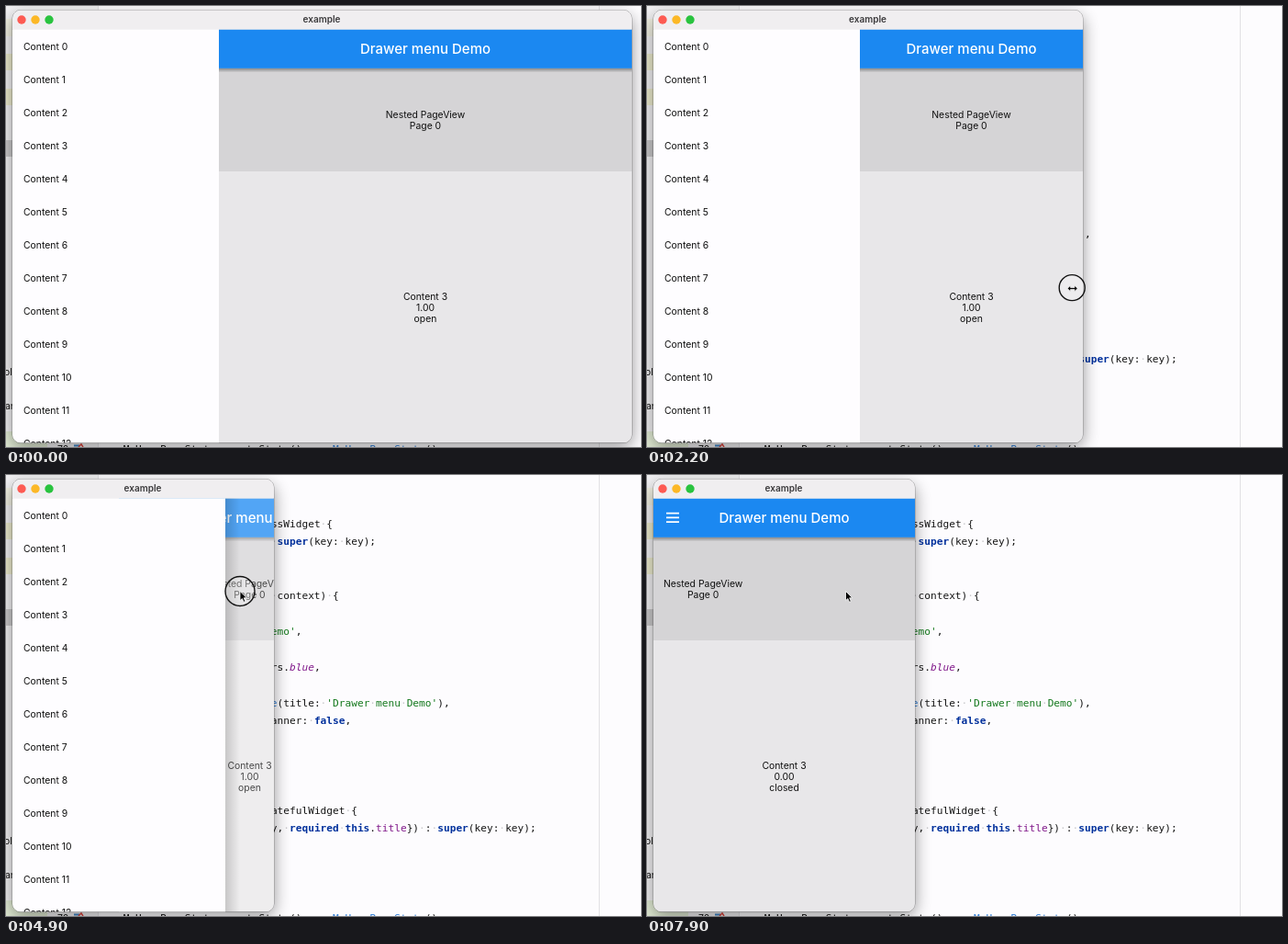
An HTML page that plays this animation: 692 px wide and 480 px high, repeating every 8000 ms.

```html
<!DOCTYPE html>
<html lang="en">
<head>
<meta charset="utf-8">
<title>Drawer menu</title>
<style>
  html, body { margin: 0; width: 100%; height: 100%; overflow: hidden; background: #fdfcfe; }
  svg { display: block; }
  text { font: 10.4px Inter, "Open Sans", sans-serif; fill: #111; white-space: pre; }
  .mid { text-anchor: middle; }
  .code text { font: 11.17px "DejaVu Sans Mono", monospace; fill: #151515; }
  .code .dots { fill: #c9c8cb; }
  .kw { fill: #00309c; font-weight: bold; }
  .str { fill: #13781c; }
  .field { fill: #80188a; }
  .type { fill: #2c7bd6; }
  .slant { font-style: italic; }
  #name { font-weight: 600; font-size: 10px; fill: #3a393b; }
  #title { font-weight: 500; font-size: 15px; fill: #fff; }
</style>
</head>
<body>
<svg id="stage" width="692" height="480" viewBox="0 0 692 480">
  <defs>
    <filter id="blur" x="-20%" y="-20%" width="140%" height="140%"><feGaussianBlur stdDeviation="9"/></filter>
    <linearGradient id="barShade" x2="0" y2="1">
      <stop stop-color="#000" stop-opacity=".38"/><stop offset="1" stop-color="#000" stop-opacity="0"/>
    </linearGradient>
    <linearGradient id="edgeShade">
      <stop stop-color="#000" stop-opacity=".16"/><stop offset="1" stop-color="#000" stop-opacity="0"/>
    </linearGradient>
    <clipPath id="winClip"><rect class="win" x="7" y="4.5" height="471" rx="9"/></clipPath>
  </defs>

  <rect width="692" height="480" fill="#fdfcfe"/>
  <rect width="101" height="480" fill="#f1f0f2"/>
  <g id="strips"></g>
  <path d="M100.5 0V480M646.5 0V480" stroke="#e2e1e4"/>
  <text x="-2" y="402">oll</text>
  <text x="-1" y="439">ar</text>
  <text x="56" y="486" fill="#999">70</text>
  <path d="M74 478.5h6" stroke="#3f86c8" stroke-width="2"/>
  <path d="M79 480l3-3 2 3" stroke="#d8443c" fill="none" stroke-width="1.5"/>
  <g class="code" id="code"></g>

  <rect class="win" x="7" y="11" height="469" rx="9" opacity=".42" filter="url(#blur)"/>
  <rect class="win" x="7" y="4.5" height="471" rx="9" fill="#e8e7e9" stroke="#000" stroke-opacity=".3"/>
  <g clip-path="url(#winClip)">
    <rect class="win" x="7" y="4" height="21.5" fill="#f0eef0"/>
    <circle cx="17" cy="15" r="4.7" fill="#fd5b53"/>
    <circle cx="32" cy="15" r="4.7" fill="#fcb827"/>
    <circle cx="47" cy="15" r="4.7" fill="#29c33f"/>
    <text id="name" class="mid" y="18.2">example</text>

    <svg id="body" y="25.5" height="450">
      <rect width="100%" height="450" fill="#e8e7e9"/>
      <rect y="42" width="100%" height="112.5" fill="#d5d4d6"/>
      <g id="pages"></g>
      <rect y="42" width="100%" height="5" fill="url(#barShade)"/>
      <rect width="100%" height="42.3" fill="#1b88f1"/>
      <text id="title" class="mid" x="50%" y="26.3">Drawer menu Demo</text>
      <path id="burger" d="M14 16.2h14M14 20.9h14M14 25.6h14" stroke="#fff" stroke-width="1.7"/>
      <text class="mid" x="50%" y="294.8">Content 3</text>
      <text class="mid" x="50%" y="306.8" id="value"></text>
      <text class="mid" x="50%" y="318.8" id="state"></text>
      <rect id="veil" width="100%" height="450" fill="#fff"/>
    </svg>
    <rect id="edge" y="25.5" width="16" height="450" fill="url(#edgeShade)"/>
    <g id="drawer"><rect id="sheet" y="25.5" height="450" fill="#fefdff"/></g>
  </g>

  <g id="pointer">
    <circle id="ring" fill="#fff" fill-opacity=".22" stroke="#111" stroke-width="1.4"/>
    <path id="arrow" d="M0 0V10.2L2.4 8L4 11.8L5.8 11L4.2 7.3H7.4Z" fill="#000" stroke="#fff" stroke-width=".8"/>
    <path id="resize" d="M-5.5 0L-2.2 -3.2V-1H2.2V-3.2L5.5 0L2.2 3.2V1H-2.2V3.2Z" fill="#000" stroke="#fff" stroke-width=".7"/>
  </g>
</svg>
<script>
const LOOP = 8000, STEP = 100, LEFT = 7;
const $ = id => document.getElementById(id);
const set = (el, attrs) => { for (const k in attrs) el.setAttribute(k, attrs[k]); };
const add = (parent, tag, attrs, html = "") => {
  const el = document.createElementNS("http://www.w3.org/2000/svg", tag);
  set(el, attrs);
  el.innerHTML = html;
  return parent.appendChild(el);
};
const show = (el, on) => set(el, { visibility: on ? "visible" : "hidden" });

// Code editor behind the window, keyed by row number.
const rows = {
  "-3": "  runApp(const MyApp());",
  0: "class MyApp extends StatelessWidget {",
  1: "  const MyApp({Key? key}) : super(key: key);",
  4: "  Widget build(BuildContext context) {",
  6: "      title: 'Drawer menu Demo',",
  8: "        primarySwatch: Colors.blue,",
  10: "      home: const MyHomePage(title: 'Drawer menu Demo'),",
  11: "      debugShowCheckedModeBanner: false,",
  16: "class MyHomePage extends StatefulWidget {",
  17: "  const MyHomePage({Key? key, required this.title}) : super(key: key);",
  22: "  _MyHomePageState createState() => _MyHomePageState();"
};
const rules = [
  ["str", "'[^']*'"],
  ["kw", "\\b(?:class|extends|const|super|required|this|false)\\b"],
  ["field", "title(?=})"],
  ["field slant", "blue"],
  ["type", "MyHomePage(?=\\(t)|_MyHomePageState(?=\\()|MyApp(?=\\(\\))"]
];
const syntax = new RegExp(rules.map(r => `(${r[1]})`).join("|"), "g");
const paint = line => line.replace(syntax, (m, ...groups) =>
  `<tspan class="${rules[groups.findIndex(g => g === m)][0]}">${m}</tspan>`);
for (const n in rows) {
  const at = { x: 107.5, y: 56.8 + 19.5 * n };
  add($("code"), "text", { ...at, class: "dots" }, rows[n].replace(/\S/g, "\0").replace(/ /g, "·").replace(/\0/g, " "));
  add($("code"), "text", at, paint(rows[n]));
}

const strips = [[14, 19, "#f1f0e2"], [52, 18, "#ecebcd"], [90, 18, "#ecebcd"], [146, 18, "#c9c8ca"], [463, 17, "#e0ead3"]];
for (const [y, height, fill] of strips) add($("strips"), "rect", { y, width: 45, height, fill });

for (let i = 0; i < 13; i++) add($("drawer"), "text", { x: 12, y: 48 + 36 * i }, `Content ${i}`);

const pages = [0, 1].map(i => {
  const box = add($("pages"), "svg", { y: 42, height: 112, width: "100%" });
  add(box, "text", { class: "mid", x: "50%", y: 54.8 }, "Nested PageView");
  add(box, "text", { class: "mid", x: "50%", y: 66.8 }, `Page ${i}`);
  return box;
});

// Keys are [time, value, value...], joined by straight lines.
const edgeKeys = [[0, 682], [100, 676], [600, 505], [800, 520], [1200, 690], [1500, 690],
  [1800, 662], [2000, 562], [2600, 301], [2800, 292]];
const pointerKeys = [[100, 674, 300], [600, 503, 302], [800, 518, 302], [1200, 690, 302], [1500, 688, 302],
  [1800, 648, 302], [2000, 545.3, 302.7], [2600, 299, 314.5], [2800, 291, 315], [3400, 29.5, 53.5],
  [3800, 29.5, 53.5], [4500, 253, 124], [4600, 255, 126.5], [5800, 255, 126.5], [6000, 216.5, 126.5]];
function along(keys, t) {
  const i = keys.findIndex(k => k[0] > t);
  if (i < 1) return (i ? keys[keys.length - 1] : keys[0]).slice(1);
  const a = keys[i - 1], b = keys[i], f = (t - a[0]) / (b[0] - a[0]);
  return a.slice(1).map((v, j) => v + (b[j + 1] - v) * f);
}
const ramp = (t, start, time) => Math.min(1, Math.max(0, (t - start) / time));
const inOut = (f, n) => f < .5 ? (2 * f) ** n / 2 : 1 - (2 - 2 * f) ** n / 2;
const within = (t, a, b) => t >= a && t <= b;

function draw(t) {
  const [edge] = along(edgeKeys, t);
  const docked = t < 2700;
  const open = docked
    ? 1 - inOut(ramp(t, 2200, 300), 2)
    : inOut(ramp(t, 3650, 400), 2) - inOut(ramp(t, 4900, 400), 2);
  const sheet = docked ? 225 : 232;
  const bodyX = LEFT + sheet * open * (docked ? 1 : .5);
  const bodyW = docked ? edge - bodyX : edge - LEFT;

  document.querySelectorAll(".win").forEach(el => set(el, { width: edge - LEFT }));
  set($("name"), { x: (edge + LEFT) / 2 - .5 });
  set($("body"), { x: bodyX, width: bodyW });
  set($("veil"), { opacity: docked ? 0 : .24 * open });
  set($("burger"), { opacity: docked ? 1 - open : 1 });
  $("value").textContent = open.toFixed(2);
  $("state").textContent = open > 0 ? "open" : "closed";
  set($("sheet"), { width: sheet });
  set($("drawer"), { transform: `translate(${LEFT + sheet * (open - 1)})` });
  show($("drawer"), open > 0);
  set($("edge"), { x: LEFT + sheet * open, opacity: docked ? 0 : open });

  const page = 1 - (1 - ramp(t, 6100, 570)) ** 3 - inOut(ramp(t, 7600, 523), 3);
  pages.forEach((box, i) => {
    set(box, { x: (i - page) * bodyW });
    show(box, Math.abs(i - page) < 1);
  });

  const [x, y] = along(pointerKeys, t), sizing = t < 2850;
  set($("pointer"), { transform: `translate(${x} ${y})` });
  show($("pointer"), t >= 100);
  const pressed = within(t, 100, 2700) || within(t, 3500, 3600) || within(t, 4800, 5000);
  set($("ring"), { r: t < 4000 ? 14 : 16, opacity: pressed ? 1 : 0 });
  set($("resize"), { opacity: sizing ? 1 : 0, transform: "translate(.5 .8)" });
  set($("arrow"), { opacity: sizing ? 0 : 1 });
}

const begin = performance.now();
function tick() {
  const t = Math.max(0, performance.now() - begin) % LOOP;
  draw(Math.floor(t / STEP) * STEP);
  requestAnimationFrame(tick);
}
tick();
</script>
</body>
</html>
```
